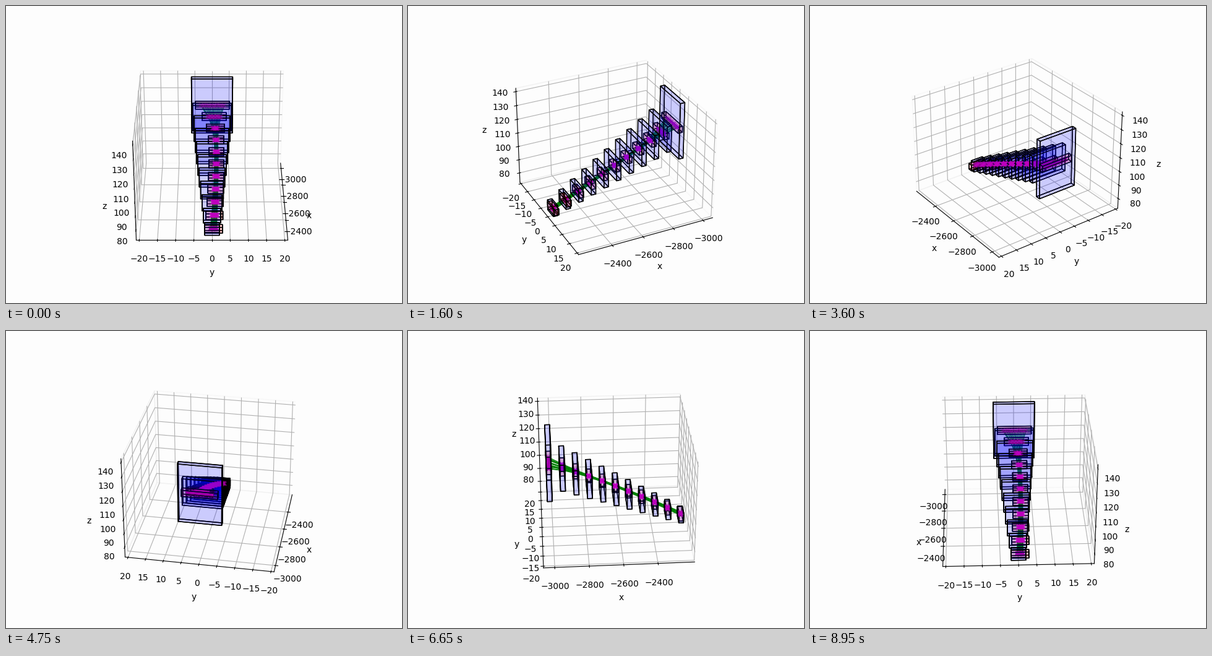
A matplotlib script for the animation above (9 s loop, 640 by 480 pixels).

```python
import itertools

import numpy as np
import matplotlib.pyplot as plt
from matplotlib.animation import FuncAnimation
from mpl_toolkits.mplot3d.art3d import Poly3DCollection

FRAMES = 180
STATIONS = 11
TRACKS = 14
HALF_DEPTH = 14.5
PAPER = "#fdfdfd"
BLUE = (0, 0, 1, 0.1)
RED = (1, 0, 0, 0.1)

fig = plt.figure(figsize=(6.4, 4.8), dpi=100, facecolor=PAPER)
ax = fig.add_subplot(projection="3d", facecolor=PAPER)
for axis in (ax.xaxis, ax.yaxis, ax.zaxis):
    axis.pane.fill = False


def add_box(center, half, color):
    """Draw a translucent box from its centre and half sizes."""
    center, half = np.array(center), np.array(half)
    faces = []
    for k, side in itertools.product(range(3), (-1, 1)):
        quad = []
        for a, b in ((-1, -1), (1, -1), (1, 1), (-1, 1)):
            corner = np.insert([a, b], k, side)
            quad.append(center + corner * half)
        faces.append(quad)
    ax.add_collection3d(Poly3DCollection(faces, facecolors=color,
                                         edgecolors="k", linewidths=1))


# The beam bends and narrows up to its waist, then fans out
station = np.arange(STATIONS)
from_waist = station - 6
before = np.maximum(-from_waist, 0)
after = np.maximum(from_waist, 0)

plane_x = -2219 - 79.5 * station
plane_z = 78.6 + 4.13 * station
beam_y = 1.25 - 0.024 * before**2 - 0.07 * after**2
beam_z = plane_z + 0.8 * np.sin(np.pi * station / 10)
window_y = 2.1 + 0.01 * before**2 + 0.09 * after**2.5
spread = window_y - 1.6

for i, x in enumerate(plane_x):
    height = 20 if i == STATIONS - 1 else 3.7 + 0.62 * i
    add_box((x, 0, plane_z[i]), (HALF_DEPTH, 2 + 0.4 * i, height), BLUE)
    add_box((x, beam_y[i], beam_z[i]), (HALF_DEPTH, window_y[i], 2.15), RED)

rng = np.random.default_rng(4)
fan = np.linspace(-1, 1, TRACKS)
early = rng.permutation(fan)
lift = rng.uniform(-0.5, 0.5, TRACKS)
mix = np.clip(from_waist / 3, 0, 1)
hits = []
for f, e, dz in zip(fan, early, lift):
    ys = beam_y + spread * (e * (1 - mix) + f * mix)
    zs = beam_z + dz * np.cos(np.pi * station / 10)
    ax.plot(plane_x, ys, zs, "g-", lw=1)
    hits.append((plane_x, ys, zs))
ax.scatter(*np.hstack(hits), c="m", marker="x")

ax.set_xlim(-3065.3, -2186.5)
ax.set_ylim(-20.833, 20.833)
ax.set_zlim(72.7, 142.4)
ax.set_xticks(np.arange(-3000, -2399, 200))
ax.set_xlabel("x")
ax.set_ylabel("y")
ax.set_zlabel("z")


def update(i):
    ax.view_init(elev=30, azim=i * 360 / FRAMES)
    return ()


anim = FuncAnimation(fig, update, frames=FRAMES, interval=50, repeat=True)
plt.show()
```
